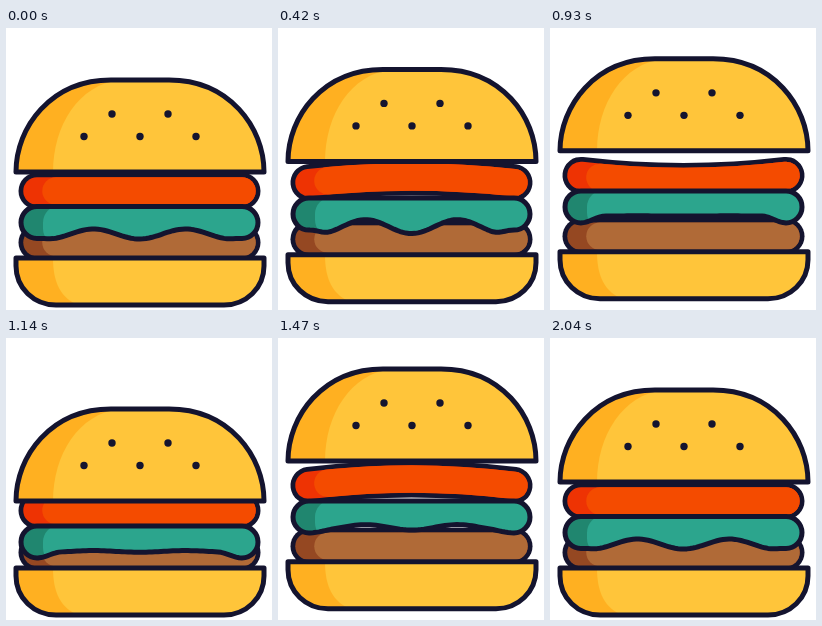
These frames come from a looping animation (266x282 px, 2.07 s). An HTML page with a canvas:

```html
<!DOCTYPE html>
<html lang="en">
<head>
<meta charset="utf-8">
<title>Bouncing burger</title>
<style>
html, body { margin: 0; width: 100%; height: 100%; overflow: hidden; background: #fff; }
canvas { display: block; width: 266px; height: 282px; }
</style>
</head>
<body>
<canvas></canvas>
<script>
const LOOP = 2070, STEP = 30, INK = '#14142f';
const LEFT = 31, RIGHT = 236, MIDDLE = (LEFT + RIGHT) / 2;

const canvas = document.querySelector('canvas');
const ctx = canvas.getContext('2d');
const ratio = window.devicePixelRatio || 1;
canvas.width = 266 * ratio;
canvas.height = 282 * ratio;
ctx.scale(ratio, ratio);
ctx.lineCap = ctx.lineJoin = 'round';

// Turning points of each motion: [time, value]
const LIFT = [[0, 0], [285, -14], [590, 46], [1140, -19], [1330, 25], [1710, -4], [LOOP, 0]];
const ARCH = [[0, 0], [285, 0], [620, 16], [930, -6], [1370, 8], [1640, -3], [LOOP, 0]];
const WAVE = [[0, 5], [400, 7], [680, 0], [800, 0], [LOOP, 5]];

// Falls speed up like gravity, rises ease in and out
function at(track, t) {
  const i = track.findIndex(([time]) => time > t);
  const [t0, a] = track[i - 1], [t1, b] = track[i];
  const u = (t - t0) / (t1 - t0);
  return a + (b - a) * (b < a ? u * u : (1 - Math.cos(Math.PI * u)) / 2);
}

// Outlined shape with a darker left side
function shaded(shape, light, colour, shade) {
  ctx.fillStyle = shade;
  ctx.fill(shape);
  ctx.save();
  ctx.clip(shape);
  ctx.fillStyle = colour;
  ctx.fill(light);
  ctx.restore();
  ctx.strokeStyle = INK;
  ctx.lineWidth = 5;
  ctx.stroke(shape);
}

// Round-ended slice, bent upwards by arch
function slice(y, arch, colour, shade) {
  const path = new Path2D(`M${LEFT} ${y}Q${MIDDLE} ${y - 2 * arch} ${RIGHT} ${y}`);
  const layer = (width, style) => {
    ctx.lineWidth = width;
    ctx.strokeStyle = style;
    ctx.stroke(path);
  };
  layer(37, INK);
  layer(27.5, shade);
  ctx.setLineDash([999, 999]);
  ctx.lineDashOffset = -19;
  layer(27.5, colour);
  ctx.setLineDash([]);
}

// Drooping ends with a cosine hem between them
function lettuce(y, wave) {
  const shape = new Path2D();
  shape.arc(LEFT, y + 16, 16, Math.PI / 2, Math.PI * 1.5);
  shape.arc(RIGHT, y + 16, 16, -Math.PI / 2, Math.PI / 2);
  for (let x = RIGHT; x > LEFT; x -= 3) {
    const u = Math.min(1, (x - LEFT) / 24, (RIGHT - x) / 24);
    const hem = 25 + wave / 2 + wave * Math.cos((x - MIDDLE) / 92 * 2 * Math.PI);
    shape.lineTo(x, y + 32 + (hem - 32) * u * u * (3 - 2 * u));
  }
  shape.closePath();
  const light = new Path2D();
  light.roundRect(37, y - 1, 260, 40, 17);
  shaded(shape, light, '#2ca58d', '#20866f');
}

function bun(y, outline, edge) {
  ctx.save();
  ctx.translate(0, y);
  shaded(new Path2D(outline), new Path2D(edge), '#ffc53a', '#ffb021');
  ctx.restore();
}

function seed(x, y) {
  ctx.fillStyle = INK;
  ctx.beginPath();
  ctx.arc(x, y, 3.7, 0, 7);
  ctx.fill();
}

function draw(now) {
  const t = Math.floor(now % LOOP / STEP) * STEP;
  const lift = at(LIFT, t);
  const follow = lift > 0 ? lift ** 0.9 : lift / 2;
  const top = 144 - lift;
  const leaf = 178.5 - follow;
  const base = 230 - 0.4 * Math.max(0, follow);

  ctx.fillStyle = '#fff';
  ctx.fillRect(0, 0, 266, 282);
  slice(base - 15.5, 0, '#b06a37', '#954822');
  bun(base, 'M10 0H258V8C258 30 240 47 218 47H50C28 47 10 30 10 8Z',
    'M47 0C47 25 55 40 72 47H270V0Z');
  slice(leaf - 15.5, at(ARCH, t), '#f44b00', '#ee3303');
  lettuce(leaf, at(WAVE, t));
  bun(top, 'M10 0C10 -45 45 -92 105 -92H163C223 -92 258 -45 258 0Z',
    'M47 0C47 -47 73 -87 113 -92H270V0Z');
  for (let i = 0; i < 5; i++) seed(78 + 28 * i, top - (i % 2 ? 58 : 35.5));
}

const start = performance.now();
function tick() {
  draw(performance.now() - start);
  requestAnimationFrame(tick);
}
tick();
</script>
</body>
</html>
```
